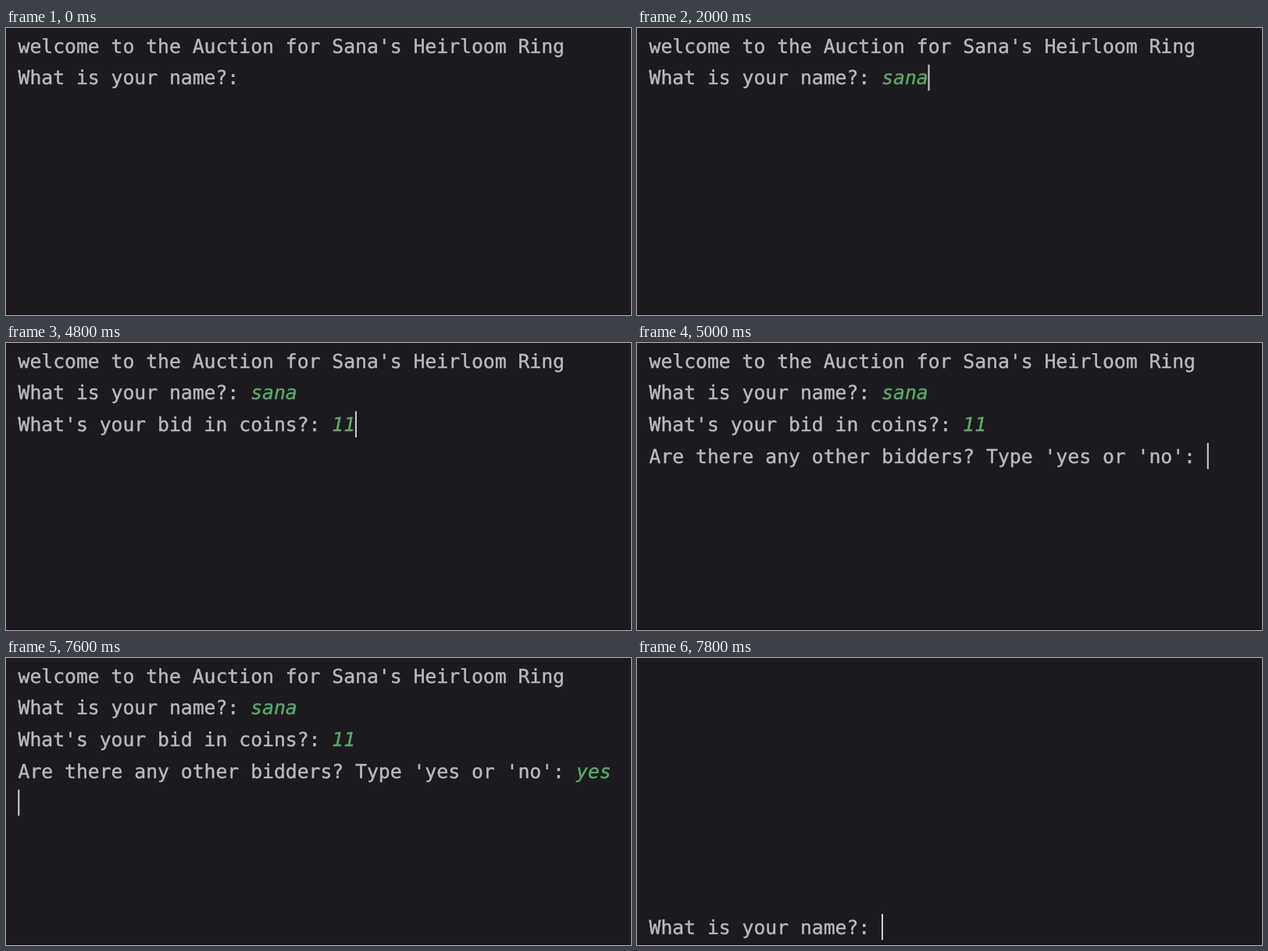
Animation, 800 px wide and 368 px high, one loop 8000 ms. Source, as an HTML page:

```html
<!DOCTYPE html>
<html lang="en">
<head>
<meta charset="utf-8">
<title>Auction console</title>
<style>
  html, body { margin: 0; width: 100%; height: 100%; overflow: hidden; background: #1c1a1f; }
  svg { display: block; width: 800px; height: 368px; }
  text {
    font: 24.72px "DejaVu Sans Mono", "Noto Sans Mono", monospace;
    text-rendering: geometricPrecision;
    white-space: pre;
    fill: #b9bac0;
    stroke: #b9bac0;
    stroke-width: 0.4px;
  }
  .answer { fill: #5ca968; stroke: #5ca968; font-style: italic; }
  #caret { fill: #cfd0d6; }
</style>
</head>
<body>
<svg id="stage" viewBox="0 0 800 368">
  <rect width="800" height="368" fill="#1c1a1f"/>
  <rect y="367" width="800" height="1" fill="#150a17"/>
  <rect id="caret" width="2" height="33.5"/>
</svg>
<script>
const LOOP = 8000, LEFT = 15.5, CELL = 14.883, TOP = 31.8, PITCH = 40.65;
const CLEAR = 7700, BOTTOM = 353.7, BLINK = 200;

// Times in ms: caret ready, first and last keystroke, Enter
const questions = [
  { prompt: "What is your name?: ", answer: "sana", ready: 300, first: 1000, last: 2000, enter: 2700 },
  { prompt: "What's your bid in coins?: ", answer: "11", ready: 2900, first: 4100, last: 4300, enter: 4900 },
  { prompt: "Are there any other bidders? Type 'yes or 'no': ", answer: "yes", ready: 4900, first: 6100, last: 6500, enter: 7400 }
];

const stage = document.getElementById("stage");
const caret = document.getElementById("caret");
const baseline = row => TOP + row * PITCH;

function make(tag, attrs, parent, content = "") {
  const el = document.createElementNS("http://www.w3.org/2000/svg", tag);
  for (const key in attrs) el.setAttribute(key, attrs[key]);
  el.textContent = content;
  return parent.appendChild(el);
}

function addLine(y, prompt, x) {
  const text = make("text", { x: LEFT, y }, stage);
  make("tspan", {}, text, prompt);
  return { text, answerEl: make("tspan", { class: "answer", x }, text) };
}

const setVisible = (el, on) => el.setAttribute("visibility", on ? "visible" : "hidden");

function placeCaret(column, y, on = true) {
  caret.setAttribute("x", LEFT - 0.2 + column * CELL);
  caret.setAttribute("y", y - 25.6);
  setVisible(caret, on);
}

// Keystrokes are evenly spread between the first and the last
function typedCount({ answer, first, last }, time) {
  if (time < first) return 0;
  const gap = (last - first) / (answer.length - 1);
  return Math.min(answer.length, 1 + Math.floor((time - first) / gap));
}

const title = addLine(baseline(0), "welcome to the Auction for Sana's Heirloom Ring", LEFT).text;
questions.forEach((q, i) => {
  q.y = baseline(i + 1);
  Object.assign(q, addLine(q.y, q.prompt, LEFT + q.prompt.length * CELL));
});
const nextPrompt = questions[0].prompt;
const next = addLine(BOTTOM, nextPrompt, LEFT).text;
stage.append(caret);

function draw(time) {
  const cleared = time >= CLEAR;
  setVisible(title, !cleared);
  setVisible(next, cleared);
  questions.forEach((q, i) => {
    const asked = i === 0 || time >= q.ready;
    const typed = typedCount(q, time);
    setVisible(q.text, asked && !cleared);
    q.answerEl.textContent = q.answer.slice(0, typed);
    if (!asked) return;
    if (time >= q.enter) return placeCaret(0, q.y + PITCH);
    const blinkedOff = time >= q.first - BLINK && time < q.first;
    placeCaret(q.prompt.length + typed, q.y, time >= q.ready && !blinkedOff);
  });
  if (cleared) placeCaret(nextPrompt.length, BOTTOM);
}

let start;
function tick(now) {
  start ??= now;
  draw((now - start) % LOOP);
  requestAnimationFrame(tick);
}
draw(0);
requestAnimationFrame(tick);
</script>
</body>
</html>
```
